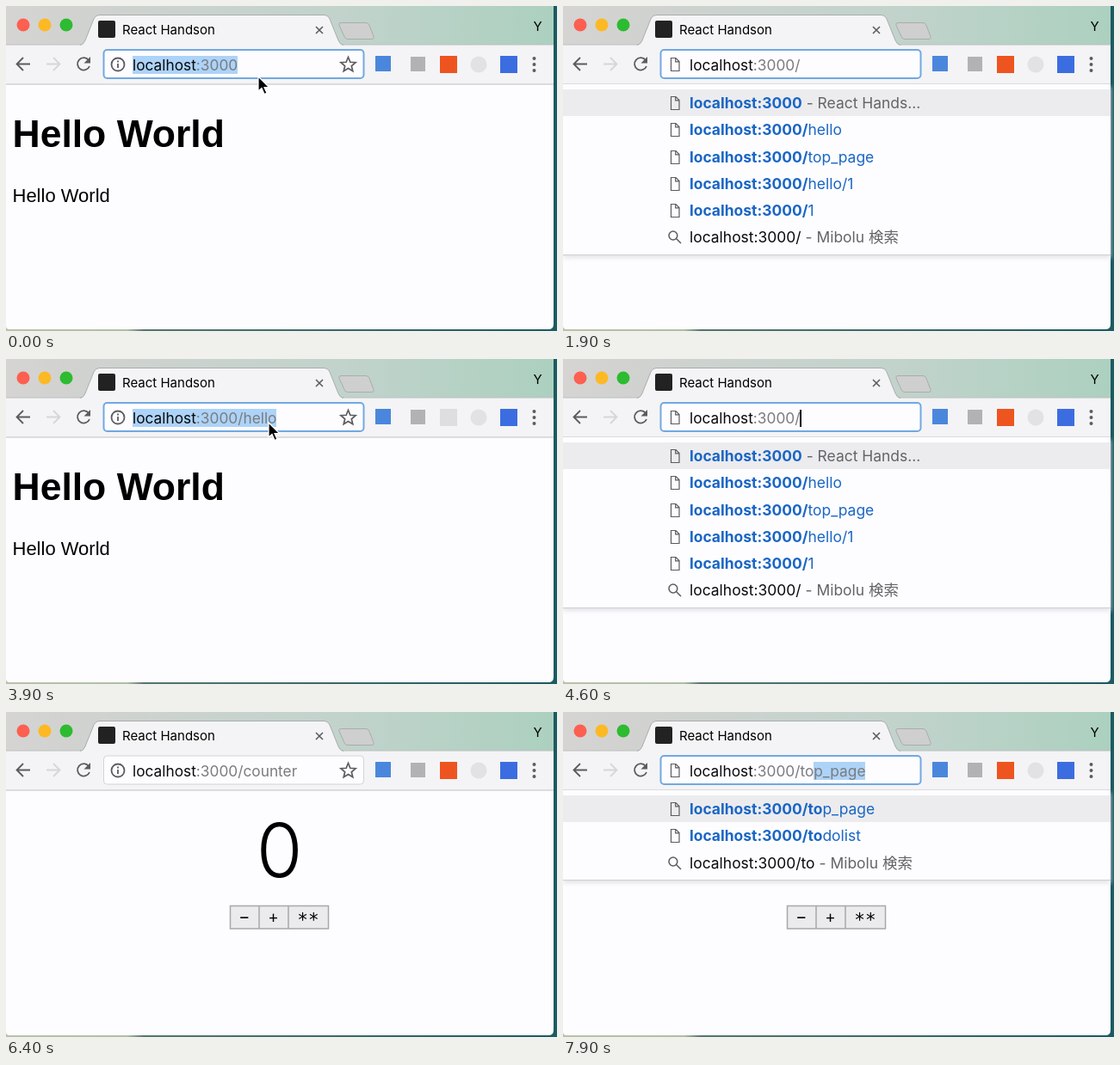
Write an HTML page that moves like this. It is 640 by 378 pixels and loops after 8 s.

```html
<!DOCTYPE html>
<html lang="ja">
<head>
<meta charset="utf-8">
<title>Browser navigation</title>
<style>
  html, body { margin: 0; width: 100%; height: 100%; overflow: hidden; }
  #stage {
    position: relative; width: 640px; height: 378px; overflow: hidden;
    font-family: Inter, "Noto Sans CJK JP", "Noto Sans CJK", sans-serif;
    font-size: 17.3px; line-height: 21px; color: #0a0a0c;
  }
  #stage > * { position: absolute; }
  #stage > svg { left: 0; top: 0; }
  .page { font-family: "Liberation Sans", Arial, sans-serif; }
  .digit { font: 300 87px Inter, sans-serif; }
  .sign { font: 300 20px "Noto Sans Mono", monospace; }
  .stars { font: 21px "DejaVu Sans Mono", monospace; }
  .line { fill: none; stroke: #5c5c60; stroke-width: 1.8; }

  #url { left: 147px; top: 58px; white-space: pre; color: #7b7b7f; }
  #url .host { color: #0a0a0c; }
  #url .sel { background: #add3f8; }
  #url .caret {
    display: inline-block; width: 1.5px; height: 20px; margin-right: -2px;
    background: #000; vertical-align: -4px;
  }

  #list {
    left: 0; top: 91px; width: 636px; box-sizing: border-box;
    padding: 6px 0 4px; background: #fdfdff; font-size: 17.45px;
    border-bottom: 1px solid #cfcfd3; box-shadow: 0 3px 5px #e4e4e9;
  }
  .row { position: relative; height: 31.3px; line-height: 32.3px; padding-left: 147px; white-space: pre; }
  .row:first-child { background: #ececef; }
  .row svg { position: absolute; left: 120px; top: 6px; }
  .row b, .row i { color: #1a66c4; font-style: normal; }
  .row span { color: #646468; }
</style>
</head>
<body>
<div id="stage">
  <svg width="640" height="378">
    <defs>
      <linearGradient id="desk">
        <stop offset="0" stop-color="#b9c2a8"/><stop offset=".22" stop-color="#b0bfa4"/>
        <stop offset=".25" stop-color="#56766f"/><stop offset="1" stop-color="#1c5a62"/>
      </linearGradient>
      <linearGradient id="bar">
        <stop offset="0" stop-color="#d5d4d2"/><stop offset=".15" stop-color="#d0d2d0"/>
        <stop offset=".6" stop-color="#c2d3cc"/><stop offset="1" stop-color="#acd0bf"/>
      </linearGradient>
      <symbol id="doc" viewBox="0 0 20 20">
        <path class="line" style="stroke-width:1.2" d="M5.5 2.5h5.5l4 4v11h-9.5zM10.7 2.7v4.1h4.1"/>
      </symbol>
      <symbol id="lens" viewBox="0 0 20 20">
        <path class="line" style="stroke-width:1.5" d="M12.8 8a4.9 4.9 0 1 1-9.8 0a4.9 4.9 0 1 1 9.8 0M11.5 11.5l5.5 5.5"/>
      </symbol>
      <clipPath id="window"><path d="M0 0H636V370q0 6-6 6H4q-4 0-4-4z"/></clipPath>
    </defs>
    <rect width="640" height="378" fill="url(#desk)"/>
    <g clip-path="url(#window)">
      <rect width="636" height="378" fill="#fdfdff"/>
      <rect width="636" height="45" fill="url(#bar)"/>
      <rect y="45" width="636" height="46" fill="#f4f4f6"/>
      <path d="M0 45H88M390 45H636M0 91H636" stroke="#bcbfbf"/>
    </g>

    <circle cx="20" cy="22" r="7.5" fill="#fd5f50"/>
    <circle cx="45" cy="22" r="7.5" fill="#fdb924"/>
    <circle cx="70" cy="22" r="7.5" fill="#2dbb31"/>
    <path d="M86 46Q90 45 92 40L102 15Q104 10.5 108 10.5H370Q374 10.5 376 15L386 40Q388 45 392 46z" fill="#f4f4f6"/>
    <path d="M86 45.5Q90 45 92 40L102 15Q104 10.5 108 10.5H370Q374 10.5 376 15L386 40Q388 45 392 45.5" fill="none" stroke="#a9adab"/>
    <path d="M389 19.5H418q3 0 4 3l5 13q1 3-2 3H397q-3 0-4-3l-6-13q-1-3 2-3z" fill="#cfcfcf" stroke="#a9adab"/>
    <rect x="107" y="17" width="20" height="20" rx="2" fill="#222"/>
    <text x="135" y="33" font-size="15">React Handson</text>
    <path d="M360 24l8 8m0-8l-8 8" class="line" style="stroke-width:1.6"/>
    <text x="617.5" y="29" font-size="15" text-anchor="middle">Y</text>

    <path class="line" d="M28 67.5H13M20 60l-7.5 7.5 7.5 7.5"/>
    <path class="line" style="stroke:#d6d6d9" d="M47 67.5H62M55 60l7.5 7.5-7.5 7.5"/>
    <path class="line" d="M96 63a7.2 7.2 0 1 0 1 7"/>
    <path d="M98 59v7.5h-7.5z" fill="#5c5c60"/>
    <rect id="box" x="113.5" y="51" width="302" height="33" rx="4" fill="#fdfdff"/>

    <g id="idle">
      <circle class="line" cx="130" cy="68" r="7.5"/>
      <path class="line" d="M130 67v5M130 63.5v2"/>
      <path id="star" class="line" style="stroke-width:1.7"/>
    </g>
    <use id="typing" href="#doc" x="120" y="58" width="20" height="20"/>

    <rect x="429" y="58" width="18" height="18" fill="#4a87dc"/>
    <rect x="470" y="59" width="17" height="17" fill="#b2b2b5"/>
    <rect id="tool" x="504" y="58" width="20" height="20"/>
    <circle cx="549" cy="68" r="9.5" fill="#e2e2e4"/>
    <rect x="574" y="58" width="20" height="20" fill="#3c6de0"/>
    <g fill="#5c5c60">
      <circle cx="613.5" cy="61" r="2"/><circle cx="613.5" cy="68" r="2"/><circle cx="613.5" cy="75" r="2"/>
    </g>

    <g id="hello" class="page">
      <text x="7.5" y="164" font-size="44.5" font-weight="700">Hello World</text>
      <text x="7.5" y="228" font-size="22">Hello World</text>
    </g>
    <g id="counter" text-anchor="middle">
      <text class="digit" x="317.5" y="191.5">0</text>
      <path d="M260.5 225.5H374.5V252H260.5zM294 225.5V252M328 225.5V252" fill="#ebebee" stroke="#a8a8ac" stroke-width="1.5"/>
      <text class="sign" x="277" y="245.500">−</text>
      <text class="sign" x="310.5" y="245.500">+</text>
      <text class="stars" x="351" y="249">**</text>
    </g>
  </svg>

  <div id="url"></div>
  <div id="list"></div>
  <svg width="640" height="378">
    <path id="mouse" d="M0 0V17l4-3.5 3 7 3-1.3-3-6.7h5.5z" fill="#000" stroke="#fff" stroke-width="1.2"/>
  </svg>
</div>

<script>
const LOOP = 8000, TICK = 100;
const HOST = 'localhost:3000', NAME_LEN = 9;
const visited = ['', '/hello', '/top_page', '/hello/1', '/1', '/counter', '/todolist'];
const $ = id => document.getElementById(id);

// Each step: start, page shown, mode, text in the address bar
const steps = [];
const step = (start, page, mode, text) => steps.push({ start, page, mode, text });

// First key, accepted completion, slash, then the path at an even pace
const type = (page, path, first, accept, slash, letters, pace) => {
  step(first, page, 'type', 'l');
  step(accept, page, 'type', HOST);
  step(slash, page, 'type', HOST + '/');
  [...path].forEach((_, i) =>
    step(letters + i * pace, page, 'type', HOST + '/' + path.slice(0, i + 1)));
};

step(0, 'hello', 'select', HOST);
type('hello', 'hello', 800, 1100, 1300, 2200, 100);
step(3100, 'hello', 'idle', HOST + '/hello');
step(3700, 'hello', 'select', HOST + '/hello');
type('hello', 'count', 4200, 4400, 4600, 4700, 100);
step(5500, 'counter', 'idle', HOST + '/counter');
step(6800, 'counter', 'select', HOST + '/counter');
type('counter', 'to', 7100, 7300, 7500, 7700, 100);

const show = (id, on) => $(id).style.display = on ? '' : 'none';
const between = (t, a, b) => t >= a && t < b;
const icon = id => `<svg width="20" height="20"><use href="#${id}"/></svg>`;

function matches(text) {
  return visited.filter(p => (HOST + (p || '/')).startsWith(text)).slice(0, 5).map(p => HOST + p);
}

function drawUrl(text, selFrom, caret) {
  const cuts = [0, NAME_LEN, selFrom, text.length].sort((a, b) => a - b);
  const parts = cuts.slice(1).map((end, i) => {
    const from = cuts[i];
    const cls = (from < NAME_LEN ? 'host ' : '') + (from >= selFrom ? 'sel' : '');
    return `<span class="${cls}">${text.slice(from, end)}</span>`;
  });
  $('url').innerHTML = parts.join('') + (caret ? '<span class="caret"></span>' : '');
}

function drawList(text, found) {
  const rows = found.map(url => {
    const title = url === HOST ? '<span> - React Hands...</span>' : '';
    return `<div class="row">${icon('doc')}<b>${url.slice(0, text.length)}</b><i>${url.slice(text.length)}</i>${title}</div>`;
  });
  const hint = text.length < HOST.length + 4 ? '<span> - Mibolu 検索</span>' : '';
  rows.push(`<div class="row">${icon('lens')}${text}${hint}</div>`);
  $('list').innerHTML = rows.join('');
}

function drawMouse(t) {
  const glide = (a, b, from, to) => {
    const k = Math.min(1, Math.max(0, (t - a) / (b - a)));
    return from.map((v, i) => v + (to[i] - v) * k * k * (3 - 2 * k));
  };
  const on = t < 800 || between(t, 3400, 4200) || between(t, 6500, 7100);
  const [x, y] = t < 5000
    ? glide(3400, 3700, [293, 82], [305, 74])
    : glide(6500, 6800, [305, 74], [300, 76]);
  show('mouse', on);
  $('mouse').setAttribute('transform', `translate(${x} ${y})`);
}

function draw(t) {
  const s = steps.filter(x => x.start <= t).pop();
  const typing = s.mode === 'type';
  const found = typing ? matches(s.text) : [];
  const tail = found.length ? found[0].slice(s.text.length) : '';
  const selFrom = s.mode === 'select' ? 0 : s.text.length;
  const caret = typing && !tail && (t - s.start) % 1000 < 500;

  drawUrl(s.text + tail, selFrom, caret);
  if (typing) drawList(s.text, found);
  show('list', typing);
  show('typing', typing);
  show('idle', !typing);
  show('hello', s.page === 'hello');
  show('counter', s.page === 'counter');

  const focused = s.mode !== 'idle';
  $('box').setAttribute('stroke', focused ? '#72a8e0' : '#d4d4d7');
  $('box').setAttribute('stroke-width', focused ? 2 : 1);
  const waiting = between(t, 3100, 4000) || between(t, 5500, 6400);
  $('tool').setAttribute('fill', waiting ? '#dededf' : '#ee5420');
  drawMouse(t);
}

const points = Array.from({ length: 10 }, (_, i) => {
  const r = i % 2 ? 4 : 9, a = i * Math.PI / 5;
  return `${397.5 + r * Math.sin(a)} ${68.5 - r * Math.cos(a)}`;
});
$('star').setAttribute('d', `M${points.join('L')}z`);

const begin = performance.now();
let last = -1;
function frame() {
  const t = Math.floor((performance.now() - begin) % LOOP / TICK) * TICK;
  if (t !== last) draw(last = t);
  requestAnimationFrame(frame);
}
frame();
</script>
</body>
</html>
```
